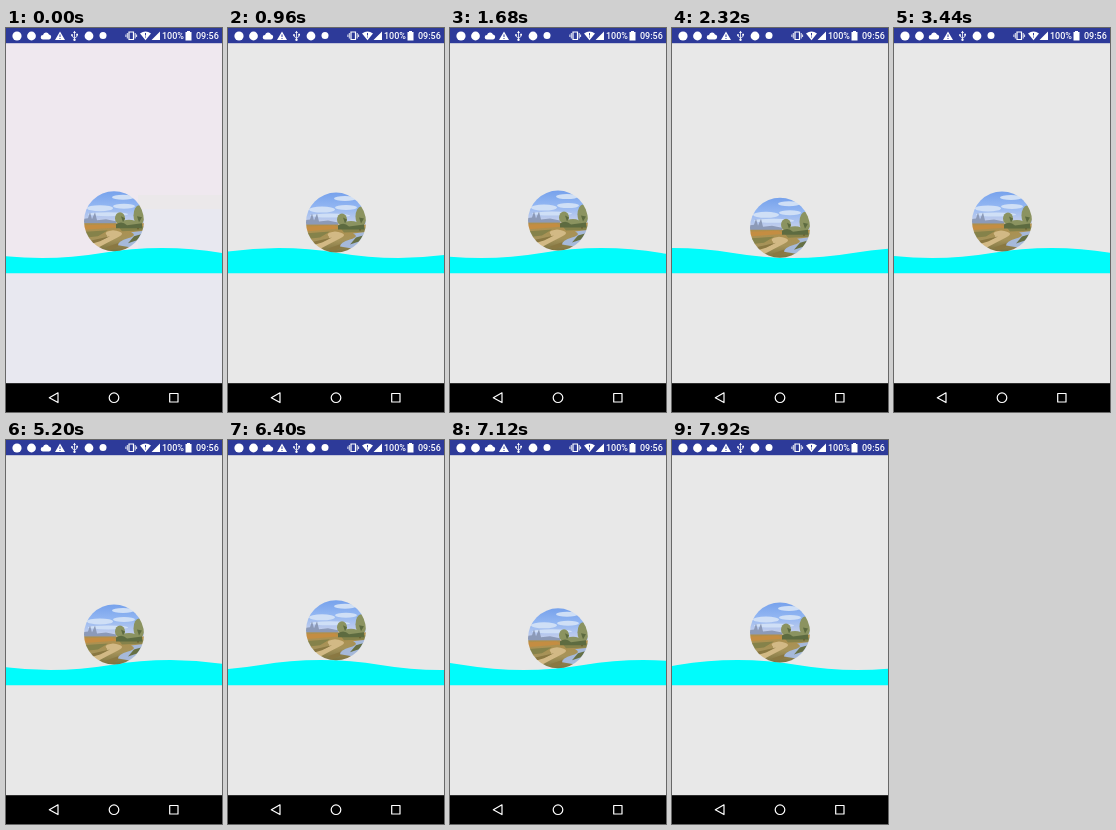
An HTML page for the animation above (8 s loop, 216 by 384 pixels).

```html
<!DOCTYPE html>
<html lang="en">
<head>
<meta charset="utf-8">
<style>
  html, body { margin: 0; width: 100%; height: 100%; overflow: hidden; background: #e8e8e8; }
  svg { display: block; width: 216px; height: 384px; }
  text { font: 500 9px Roboto, sans-serif; fill: #fff; }
</style>
</head>
<body>
<svg viewBox="0 0 216 384">
  <defs>
    <linearGradient id="sky" x2="0" y2="1">
      <stop offset="0" stop-color="#6f9cea"/>
      <stop offset=".5" stop-color="#92b6f2"/>
      <stop offset="1" stop-color="#cdd3ea"/>
    </linearGradient>
    <linearGradient id="field" x2="0" y2="1">
      <stop offset="0" stop-color="#b08f4a"/>
      <stop offset=".5" stop-color="#a5935a"/>
      <stop offset="1" stop-color="#6f6838"/>
    </linearGradient>
    <clipPath id="disc"><circle r="30"/></clipPath>
    <filter id="soft"><feGaussianBlur stdDeviation=".6"/></filter>
  </defs>

  <rect width="216" height="384" fill="#e8e8e8"/>
  <g id="tint">
    <path fill="#efe8ef" d="M0 15H216V230H0z"/>
    <path fill="#ebe8ea" d="M132 167H216V181H132z"/>
    <path fill="#e8e8f0" d="M132 181H216V230H132zM0 245H216V356H0z"/>
  </g>

  <path id="wave" fill="#00fcfc"/>

  <g id="ball"><g clip-path="url(#disc)"><g filter="url(#soft)">
    <rect x="-34" y="-34" width="68" height="37" fill="url(#sky)"/>
    <g fill="#cfdff6">
      <ellipse cx="-14" cy="-13" rx="13" ry="3"/>
      <ellipse cx="9" cy="-24" rx="11" ry="2.500"/>
      <ellipse cx="10" cy="-15" rx="11" ry="2.500"/>
      <ellipse cx="-6" cy="-7" rx="20" ry="2"/>
    </g>
    <path fill="#8c9ab8" d="M-34 3V-2L-26-3L-24-9L-22-2L-19-9L-17-1L-8-2L2 0V3z"/>
    <rect x="-34" y="2" width="68" height="32" fill="url(#field)"/>
    <path fill="#c48d42" d="M-34 4L-2 3L5 6L-34 9z"/>
    <path fill="#85824a" d="M-34 11L-6 9L-16 15L-34 17zM4 5H34V9L8 10z"/>
    <path fill="#d2b985" d="M-1 9Q14 11 4 16T-17 27L-25 21Q-2 18-8 13Q-10 10-1 9z"/>
    <path fill="#8a7842" d="M-26 20L-4 15L-14 20L-24 23zM-8 26L12 19L8 24L-4 29z"/>
    <path fill="#a6b9da" d="M34 9L17 11Q24 14 14 17T4 24L16 26L34 15z"/>
    <path fill="#667044" d="M20 15L27 13L23 19L14 22z"/>
    <path fill="#70602f" d="M6-2H8V6H6zM23-3H25V8H23z"/>
    <g fill="#8b9360">
      <ellipse cx="6" cy="-3" rx="5" ry="6"/>
      <ellipse cx="25" cy="-6" rx="5.500" ry="10"/>
      <ellipse cx="15" cy="2" rx="8" ry="3.500"/>
    </g>
    <path fill="#5d6b40" d="M2 3Q8-1 13 4L28 2V7H2zM7-5L11-3L9 1zM23-5L28-4L25 1z"/>
  </g></g></g>

  <rect width="216" height="15.200" fill="#2d3a99"/>
  <g fill="#fff">
    <circle cx="11" cy="8" r="4.600"/>
    <circle cx="25.500" cy="8" r="4.400"/>
    <path d="M37 11.500a2.300 2.300 0 0 1 0-4.600a3.200 3.200 0 0 1 6-.5a2.600 2.600 0 0 1 .2 5.100z"/>
    <path fill-rule="evenodd" d="M54 3.500L59 12H49zM53.500 6.500V9H54.500V6.500zM53.500 10V11H54.500V10z"/>
    <circle cx="83" cy="8" r="4.400"/>
    <circle cx="97" cy="7.500" r="3.500"/>
    <path d="M134 5.500Q139.500 1.500 145 5.500L139.500 12.300zM154 3.500V12H145.500z"/>
    <path d="M179.500 4H181V3H184V4H185.500V12.500H179.500z"/>
    <path d="M68.500 2.800L70 5H67z"/>
    <circle cx="68.500" cy="11.800" r="1.200"/>
    <circle cx="66" cy="7" r=".9"/>
    <path d="M70.200 5.800h1.800v1.800h-1.800z"/>
  </g>
  <g fill="none" stroke="#fff">
    <path stroke-width=".8" d="M68.500 4V12M66 7V8.300L68.500 10L71 8.500V7"/>
    <path stroke-width="1.200" d="M123 4H127.500V11.500H123z"/>
    <path stroke-width=".9" d="M121.300 5V10.500M119.900 6.500V9M129.200 5V10.500M130.600 6.500V9"/>
  </g>
  <path fill="none" stroke="#2d3a99" d="M139.500 5V7.500M139.500 8.500V9.500"/>
  <text x="156" y="11.300">100%</text>
  <text x="190" y="11.300">09:56</text>

  <rect y="355.200" width="216" height="29"/>
  <g fill="none" stroke="#fff" stroke-width="1.200" stroke-linejoin="round">
    <path d="M52 364.800V374.600L43.300 369.700z"/>
    <circle cx="108" cy="369.700" r="4.800"/>
    <path d="M163.700 365.500H172V374H163.700z"/>
  </g>
</svg>
<script>
const LOOP = 8000, STEP = 80, LENGTH = 240, HALF = LENGTH / 2, LEVEL = 225, HEIGHT = 5;
const SPEED = 0.1401, START = 96;
const [wave, ball, tint] = ['wave', 'ball', 'tint'].map(id => document.getElementById(id));

wave.setAttribute('d', `M${-LENGTH} ${LEVEL}q${HALF / 2} ${-2 * HEIGHT} ${HALF} 0` +
  `t${HALF} 0`.repeat(5) + `V245.3H${-LENGTH}z`);

// Water surface: alternating parabolic arcs
function surface(x) {
  const p = ((x % LENGTH) + LENGTH) % LENGTH;
  const u = (p % HALF) / HALF;
  return LEVEL + (p < HALF ? -1 : 1) * HEIGHT * 4 * u * (1 - u);
}

function draw(now) {
  const t = Math.floor((now % LOOP) / STEP) * STEP;
  const shift = (START + SPEED * t) % LENGTH;
  wave.setAttribute('transform', `translate(${shift} 0)`);
  ball.setAttribute('transform', `translate(108 ${surface(108 - shift) - 30})`);
  tint.setAttribute('visibility', t < STEP ? 'visible' : 'hidden');
}

function tick() {
  draw(performance.now());
  requestAnimationFrame(tick);
}
tick();
</script>
</body>
</html>
```
